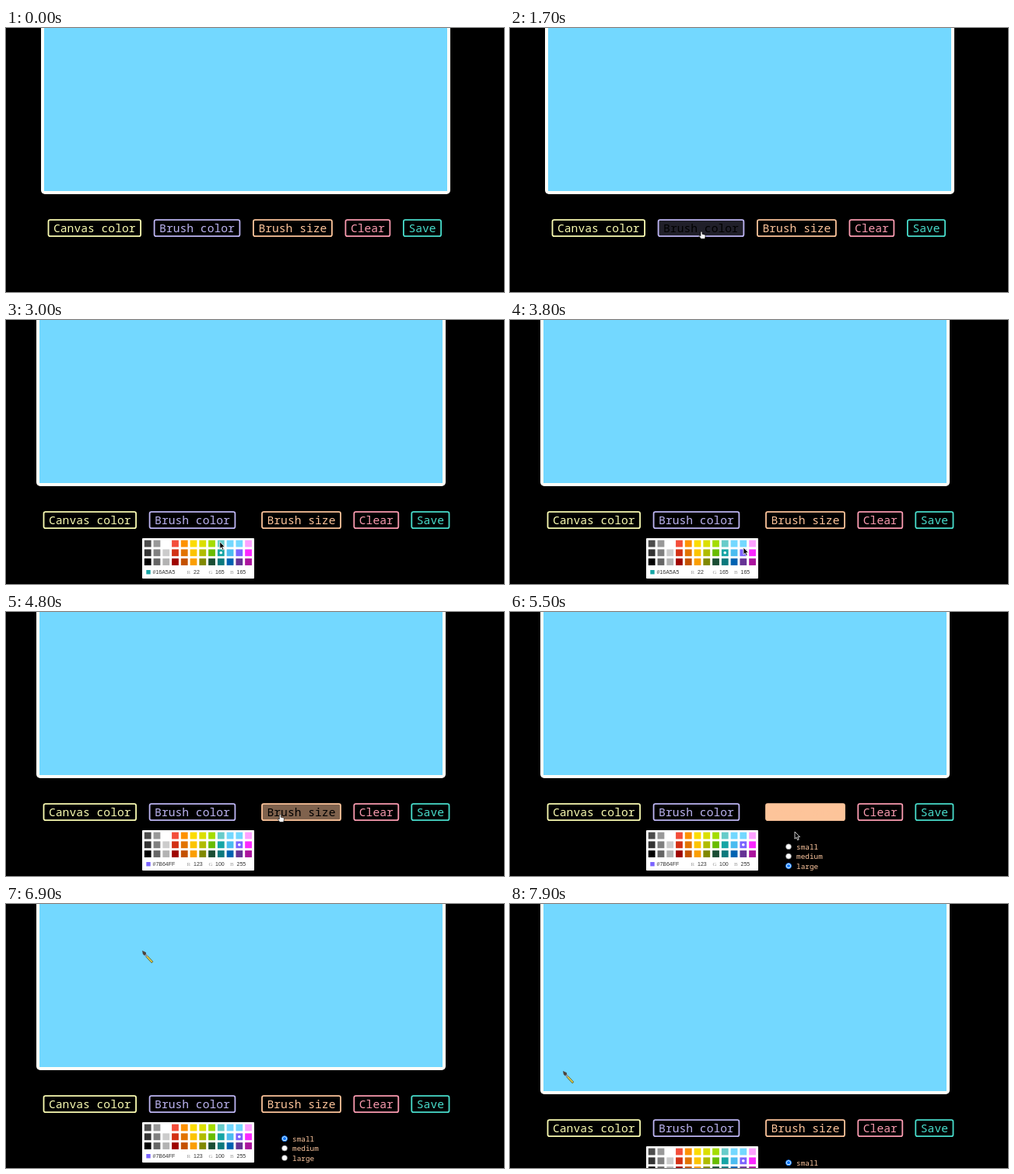
These frames come from a looping animation (640x340 px, 8 s). An HTML page:

```html
<!DOCTYPE html>
<html lang="en">
<head>
<meta charset="utf-8">
<title>Drawing board</title>
<style>
  html, body { margin: 0; width: 100%; height: 100%; overflow: hidden; background: #000; }
  svg { display: block; width: 640px; height: 340px; }
  .mono { font-family: "Noto Sans Mono", "DejaVu Sans Mono", monospace; }
  .label { font-size: 14.67px; }
  .option { font-size: 9.4px; fill: #ffc8a0; }
  .field { font: 7px "Liberation Sans", sans-serif; fill: #333; }
  .key { font: 7px "Liberation Serif", serif; fill: #999; }
</style>
</head>
<body>
<svg id="stage" viewBox="0 0 640 340"></svg>
<script>
const LOOP = 8000, STEP = 100, FADE = 300;
const OPEN_PICKER = 2200, PICK = 4100, OPEN_SIZES = 5000, PICK_SIZE = 6000;

// label, colour, x before, x after the picker opens, hover start, hover end
const BUTTONS = [
  ["Canvas color", "#fbfdb2", 53.5, 47.5],
  ["Brush color", "#bdb5f3", 189.6, 183.6, 1650, 2620],
  ["Brush size", "#fdc49a", 316.9, 328, 4650, 5500],
  ["Clear", "#fb9bb0", 435.4, 446.3],
  ["Save", "#48dccb", 509.9, 520.3]
];

const SWATCHES = [
  "4D4D4D 999999 FFFFFF F44E3B FE9200 FCDC00 DBDF00 A4DD00 68CCCA 73D8FF AEA1FF FDA1FF",
  "333333 808080 CCCCCC D33115 E27300 FCC400 B0BC00 68BC00 16A5A5 4BBCF0 7B64FF FA28FF",
  "000000 666666 B3B3B3 9F0500 C45100 FB9E00 808900 194D33 0C797D 0062B1 653294 AB149E"
].map(row => row.split(" "));

// time, x, y of the pointer tip
const PATH = [
  [400, 330, 345], [700, 300, 312], [1100, 262, 270], [1600, 250, 270],
  [1700, 246, 262], [2300, 247, 261], [2600, 256, 275], [2900, 270, 284],
  [3300, 289, 290], [3800, 300, 293], [4100, 300, 297], [4400, 318, 287],
  [4650, 348, 263], [5000, 358, 258], [5300, 363, 262], [5500, 366, 283],
  [5900, 359, 300], [6200, 361, 302], [6400, 350, 280], [6600, 300, 190],
  [6900, 175, 60], [7200, 90, 130], [7400, 62, 208], [7600, 58, 210], [7900, 68, 215]
];

const HANDS = [[1650, 2620], [3850, 4250], [4650, 5500]];
const SCROLL = [6900, 7300, 31];

const clamp = v => Math.max(0, Math.min(1, v));
const ease = v => v * v * (3 - 2 * v);
const show = (node, on) => node.setAttribute("visibility", on ? "visible" : "hidden");

function add(parent, tag, attrs, text) {
  const node = document.createElementNS("http://www.w3.org/2000/svg", tag);
  for (const key in attrs) node.setAttribute(key, attrs[key]);
  if (text) node.textContent = text;
  parent.append(node);
  return node;
}

const label = (parent, kind, x, y, text) => add(parent, "text", { class: kind, x, y }, text);

const stage = document.getElementById("stage");
const page = add(stage, "g");
const board = add(page, "g");
add(board, "rect", { x: 45, y: -60, width: 526, height: 274, rx: 5, fill: "#fffffa" });
add(board, "rect", { x: 49, y: -56, width: 518, height: 266, fill: "#73d8ff" });

const buttons = BUTTONS.map(([text, color, before, after, on, off]) => {
  const group = add(page, "g");
  const box = add(group, "rect", {
    x: 1, y: 247.2, width: text.length * 8.8 + 13, height: 21, rx: 2.2,
    stroke: color, "stroke-width": 1.8, fill: color, "fill-opacity": 0
  });
  const caption = label(group, "mono label", 7.5, 263, text);
  return { group, box, caption, color, before, after, on, off };
});

const picker = add(page, "g");
add(picker, "rect", { x: 175, y: 281, width: 144, height: 52, rx: 1, fill: "#fff" });
const cells = SWATCHES.map((row, r) => row.map((hex, c) => add(picker, "rect", {
  x: 177.8 + c * 11.76, y: 283.6 + r * 11.76, width: 8.8, height: 8.8, fill: "#" + hex
})));
const dot = add(picker, "circle", { cy: 299.8, r: 1.8, fill: "#fff" });
const chip = add(picker, "rect", { x: 180.3, y: 322, width: 5.4, height: 5.4 });
const hexText = label(picker, "field", 188.5, 327, "#");
[["R", 232.5], ["G", 260.5], ["B", 288]].forEach(([k, x]) => label(picker, "key", x, 327, k));
const rgbText = [241, 269, 296.5].map(x => label(picker, "field", x, 327, "0"));

const sizes = add(page, "g");
const radios = ["small", "medium", "large"].map((name, i) => {
  const y = 302.2 + i * 12.4;
  const ring = add(sizes, "circle", { cx: 358, cy: y, r: 3.5 , fill: "#fff" });
  const core = add(sizes, "circle", { cx: 358, cy: y, r: 2.1, fill: "#0075ff" });
  label(sizes, "mono option", 368, y + 3.6, name);
  return { ring, core };
});

const arrow = add(stage, "path", {
  d: "M0 0V9.2L2.1 7.3L3.6 10.7L5.2 10L3.7 6.7H6.5Z",
  fill: "#000", stroke: "#fff", "stroke-width": 0.8
});
const hand = add(stage, "path", {
  d: "M-1 .7Q0-.7 1 .7V3.4L4.3 4.2Q5.4 4.6 5.2 6L4.4 9.6H-.4L-3 6.2Q-3.2 4.8-1 6Z",
  fill: "#fff", stroke: "#000", "stroke-width": 0.6
});
const brush = add(stage, "g");
add(brush, "path", { d: "M5.5 7L13.2 15.2", stroke: "#5a5328", "stroke-width": 2.8 });
add(brush, "path", { d: "M5.5 7L12.8 14.8", stroke: "#e8da4c", "stroke-width": 1.6 });
add(brush, "path", { d: "M3.4 4.6L6 7.4", stroke: "#8a949c", "stroke-width": 3 });
add(brush, "path", { d: "M0 0L4.8 2.2L5 4.6L2.6 6.3L.8 4.2Z", fill: "#4d443c" });

function pointer(t) {
  const i = PATH.findIndex(p => p[0] > t);
  if (i < 0) return PATH[PATH.length - 1].slice(1);
  const a = PATH[Math.max(0, i - 1)], b = PATH[i];
  const k = a === b ? 0 : (t - a[0]) / (b[0] - a[0]);
  return [a[1] + (b[1] - a[1]) * k, a[2] + (b[2] - a[2]) * k];
}

function fillLevel(t, on, off) {
  if (!on || t < on) return 0;
  return t < off ? clamp((t - on) / FADE) : 1 - clamp((t - off) / FADE);
}

function drawPicker(t) {
  const picked = t >= PICK, hex = picked ? "7B64FF" : "16A5A5";
  show(picker, t >= OPEN_PICKER);
  cells[0][10].setAttribute("fill", t < 3000 ? "#AEA1FF" : "#73D8FF");
  dot.setAttribute("cx", 182.2 + (picked ? 10 : 8) * 11.76);
  chip.setAttribute("fill", "#" + hex);
  hexText.textContent = "#" + hex;
  rgbText.forEach((node, i) => node.textContent = parseInt(hex.substr(i * 2, 2), 16));
}

function drawSizes(t) {
  const chosen = t < PICK_SIZE ? 2 : 0;
  show(sizes, t >= OPEN_SIZES);
  radios.forEach(({ ring, core }, i) => {
    const on = i === chosen;
    ring.setAttribute("stroke", on ? "#0075ff" : "#777");
    ring.setAttribute("stroke-width", on ? 1 : 0.6);
    core.setAttribute("opacity", on ? 1 : 0);
  });
}

function render(t) {
  const open = t >= OPEN_PICKER;
  const scroll = SCROLL[2] * ease(clamp((t - SCROLL[0]) / (SCROLL[1] - SCROLL[0])));
  page.setAttribute("transform", `translate(0 ${scroll})`);
  board.setAttribute("transform", `translate(${open ? -6 : 0} 0)`);

  buttons.forEach(b => {
    b.group.setAttribute("transform", `translate(${open ? b.after : b.before} 0)`);
    b.box.setAttribute("fill-opacity", fillLevel(t, b.on, b.off));
    b.caption.setAttribute("fill", t >= b.on && t < b.off ? "#000" : b.color);
  });
  drawPicker(t);
  drawSizes(t);

  const [x, y] = pointer(t);
  const painting = y < 210 + scroll && x > 43 && x < 561;
  const pointing = HANDS.some(([a, b]) => t >= a && t < b);
  const active = painting ? brush : pointing ? hand : arrow;
  [arrow, hand, brush].forEach(node => {
    show(node, node === active && t >= PATH[0][0]);
    node.setAttribute("transform", `translate(${x} ${y})`);
  });
}

const start = performance.now();
function tick() {
  const t = (performance.now() - start) % LOOP;
  render(Math.floor(t / STEP) * STEP);
  requestAnimationFrame(tick);
}
tick();
</script>
</body>
</html>
```
